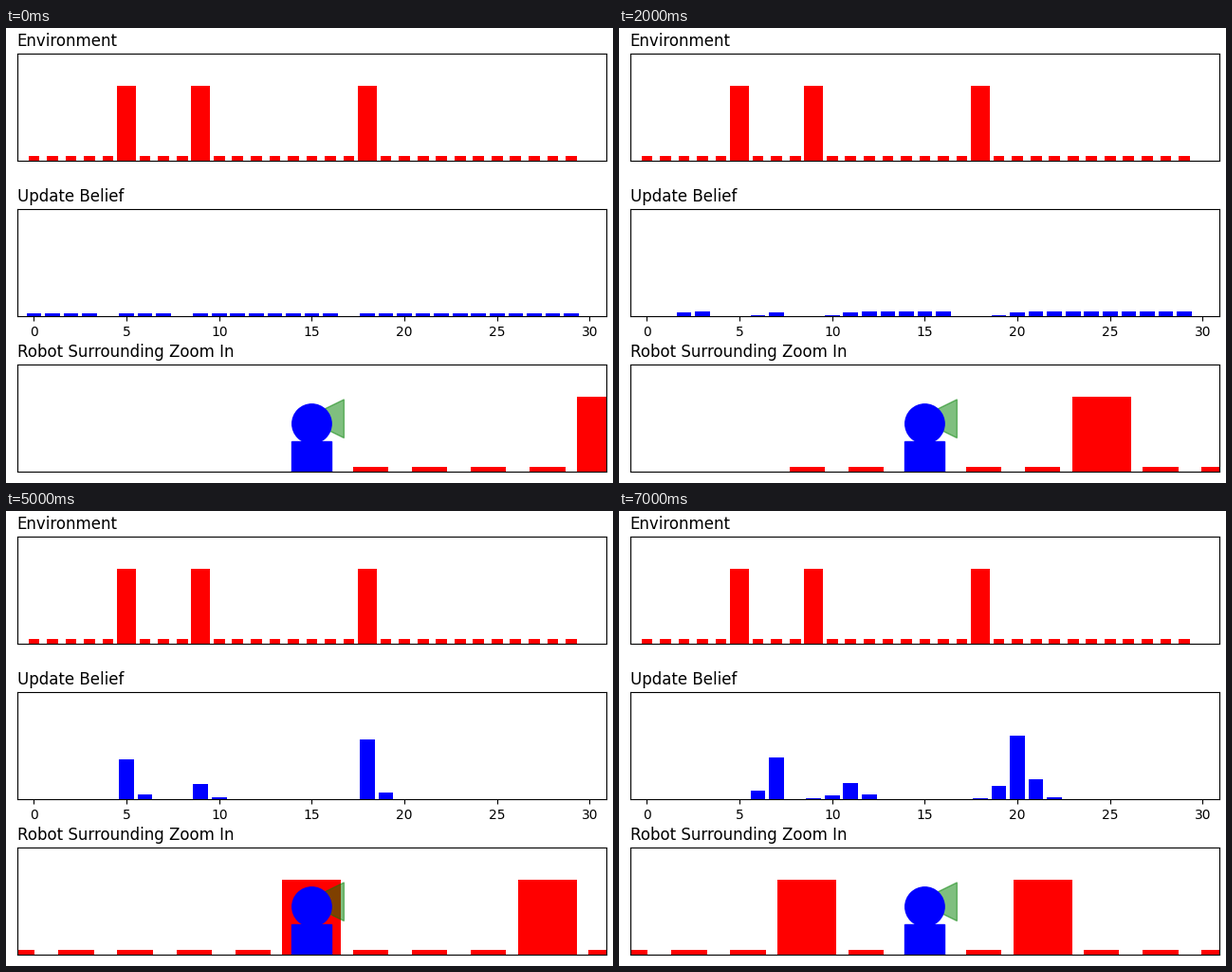
Animation, 640 px wide and 480 px high, one loop 8000 ms. Source, as a matplotlib script:

```python
import matplotlib.pyplot as plt
import numpy as np
from matplotlib.animation import FuncAnimation
from matplotlib.patches import Circle, Polygon, Rectangle
from matplotlib.transforms import Affine2D

W, H = 640, 480
CELLS = 30
STEPS = 8
DOORS = (5, 9, 18)
LEFT, RIGHT = 11.81, 633.06
BASES = (140.07, 304.13, 468.19)
PANEL_H = 112.8
BLUR = 1 / 9
VIEW = 5

cells = np.arange(CELLS)
is_door = np.isin(cells, DOORS)
door_ahead = np.isin(cells + 1, DOORS)


def sense(belief, robot):
    """Keep only the cells that agree with what lies ahead of the robot."""
    sees_door = door_ahead[robot]
    return belief * (door_ahead == sees_door) * (9 if sees_door else 1)


def move(belief):
    """Shift one cell to the right with some spread to both sides."""
    moved = BLUR * belief
    moved[1:] += belief[:-1]
    moved[2:] += BLUR * belief[:-2]
    moved[0] = 0
    return moved


def belief_history():
    belief = np.full(CELLS, 1 / 27)
    belief[0] *= 0.9
    history = [sense(belief, 0)]
    for robot in range(1, STEPS):
        history.append(sense(move(history[-1]), robot))
    return history


def add_panel(base, title, top):
    ax = fig.add_axes([LEFT / W, 1 - base / H, (RIGHT - LEFT) / W, PANEL_H / H])
    ax.set_title(title, loc="left")
    ax.set_yticks([])
    ax.set_xlim(-0.9, 30.9)
    ax.set_ylim(0, top)
    return ax


def draw_world(ax):
    ax.bar(cells, np.where(is_door, 0.7, 0.046),
           width=np.where(is_door, 1, 0.6), color="red")
    ax.set_xticks([])
    ax.set_xlim(-0.9, 30.9)
    ax.set_ylim(0, 1)


def draw_robot(ax):
    pixels = Affine2D().scale(1 / W, -1 / H).translate(0, 1) + fig.transFigure
    mid = (LEFT + RIGHT) / 2
    parts = (
        Polygon([(314.9, 412.2), (356.4, 391.9), (356.4, 432.5)],
                color="g", alpha=0.5),
        Circle((mid, 417.5), 20.7, color="blue"),
        Rectangle((301.4, 436.4), 41.6, 40, color="blue"),
    )
    for part in parts:
        part.set_transform(pixels)
        ax.add_artist(part)
        part.set_clip_path(ax.patch)


fig = plt.figure(figsize=(W / 100, H / 100), dpi=100, facecolor="white")

env = add_panel(BASES[0], "Environment", 1)
draw_world(env)

update = add_panel(BASES[1], "Update Belief", 1.2)
history = belief_history()
bars = update.bar(cells, history[0], color="blue")
update.set_xticks(range(0, 31, 5))
update.set_xlim(-0.9, 30.9)
update.set_ylim(0, 1.2)

zoom = add_panel(BASES[2], "Robot Surrounding Zoom In", 1)
draw_world(zoom)
draw_robot(zoom)


def draw(step):
    for bar, value in zip(bars, history[step]):
        bar.set_height(value)
    zoom.set_xlim(step - VIEW, step + VIEW)
    return list(bars)


draw(0)
anim = FuncAnimation(fig, draw, frames=STEPS, interval=1000, repeat=True,
                     repeat_delay=0, blit=False)
plt.show()
```
